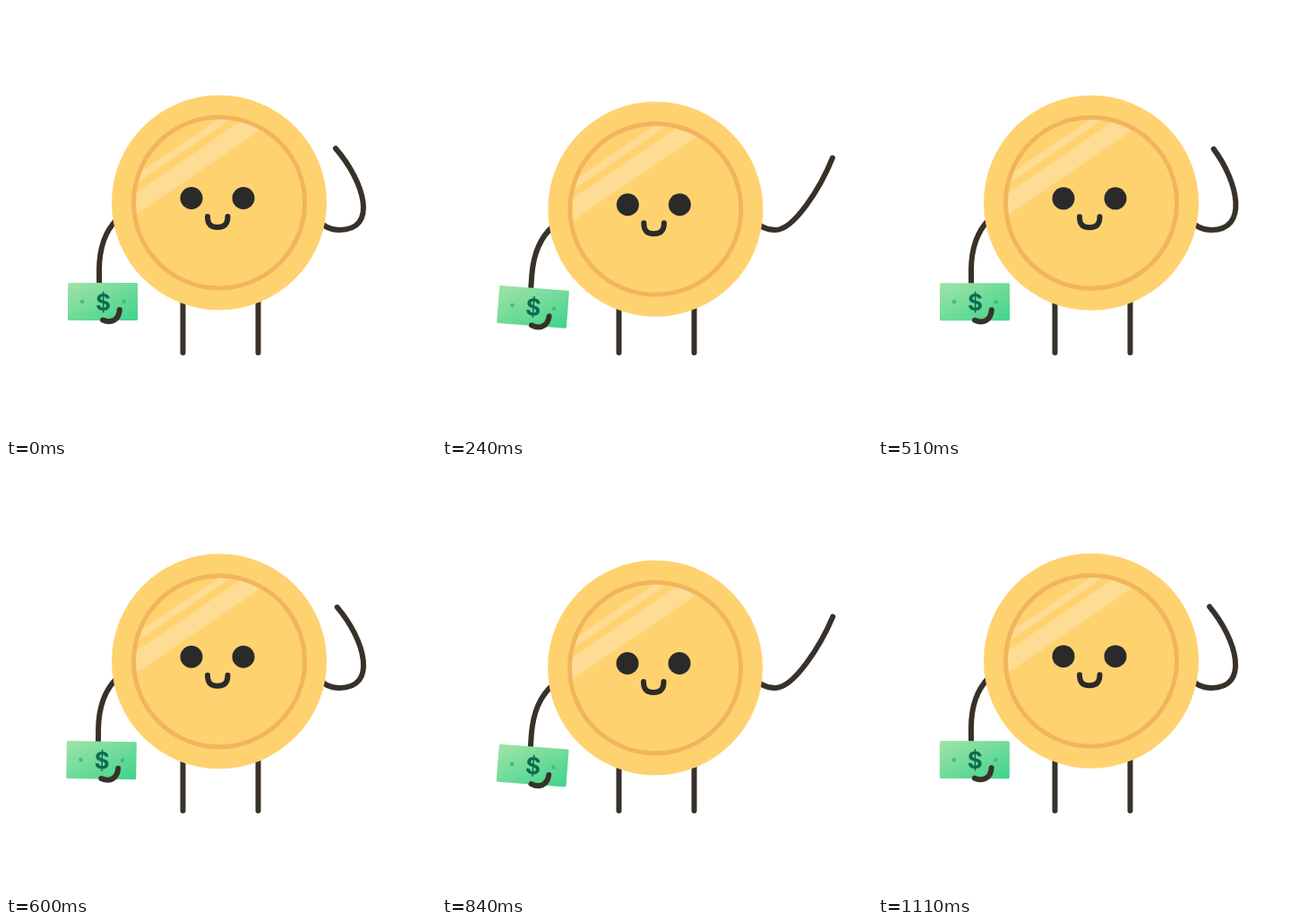
These frames come from a looping animation (480 by 480 pixels, 1.14 s). An HTML page:

```html
<!DOCTYPE html>
<html lang="en">
<head>
<meta charset="utf-8">
<title>Waving coin</title>
<style>
  html, body { margin: 0; width: 100%; height: 100%; overflow: hidden; background: #fff; }
  svg { display: block; width: 100vw; height: 100vh; }
  .limb { fill: none; stroke: #383129; stroke-width: 6; stroke-linecap: round; }
  .face { fill: #2a2a2a; }
  .smile { fill: none; stroke: #2a2a2a; stroke-width: 6; stroke-linecap: round; }
  .sign { font: 700 26px Inter, Roboto, sans-serif; fill: #0c6b50; text-anchor: middle; }
</style>
</head>
<body>
<svg viewBox="0 0 480 480">
  <defs>
    <linearGradient id="paper" x1="0" y1="0" x2="1" y2="1">
      <stop offset="0" stop-color="#a2e3a8"/>
      <stop offset="1" stop-color="#3fd38b"/>
    </linearGradient>
    <clipPath id="inner"><circle cx="238" cy="219.5" r="93"/></clipPath>
  </defs>

  <path class="limb" d="M197.500 322V387M281.500 322V387"/>
  <path class="limb" id="wave"/>

  <g id="holder">
    <path class="limb" d="M124 238C108 254 104 274 104 295Q104 325 106 345"/>
    <rect x="69" y="309" width="78" height="42" rx="1.500" fill="url(#paper)"/>
    <g fill="#45bb80">
      <circle cx="85" cy="330" r="2.300"/>
      <circle cx="131.500" cy="330" r="2.300"/>
    </g>
    <text class="sign" x="108.500" y="339.500">$</text>
    <path class="limb" d="M108 350.500C117 354.500 126 351 126.800 339"/>
  </g>

  <g id="coin">
    <circle cx="238" cy="219.500" r="120" fill="#ffd270"/>
    <g clip-path="url(#inner)" fill="#ffdc93">
      <path d="M130 199L270 103.800V113.400L130 208.600Z"/>
      <path d="M130 218.500L310 96.100V120.600L130 243Z"/>
    </g>
    <circle cx="238" cy="219.500" r="95.500" fill="none" stroke="#f2b45c" stroke-width="5"/>
    <g class="face">
      <circle cx="207" cy="214.500" r="12.500"/>
      <circle cx="265" cy="214.500" r="12.500"/>
    </g>
    <path class="smile" d="M225 235C225 243 228 247 236 247S247.500 243 247.500 235"/>
  </g>
</svg>
<script>
  const STEP = 30, COUNT = 38;
  // Steps at which each part is at rest, at its extreme, at rest, and so on
  const KEYS = {
    wave: [0, 9, 19, 29, 38],
    bob: [0, 10, 18, 28, 38],
    swing: [0, 9, 17, 27, 38]
  };
  const el = id => document.getElementById(id);
  const wave = el("wave"), holder = el("holder"), coin = el("coin");

  function swing(keys, n) {
    let i = 0;
    while (i < keys.length - 2 && n >= keys[i + 1]) i++;
    const u = (n - keys[i]) / (keys[i + 1] - keys[i]);
    const e = (1 - Math.cos(Math.PI * u)) / 2;
    return i % 2 ? 1 - e : e;
  }

  function draw(n) {
    const p = swing(KEYS.wave, n);
    const y = 8 * swing(KEYS.bob, n);
    const angle = 4.5 * swing(KEYS.swing, n);
    const x = n < 9 ? Math.sin(Math.PI * n / 9) : 0;

    coin.setAttribute("transform", `translate(${x} ${y})`);
    holder.setAttribute("transform", `translate(${x} ${y}) rotate(${angle} 122 240)`);
    wave.setAttribute("d",
      `M348 238C354 246 362 250 372 250` +
      `C${416 - 24 * p} 250 ${400 + 23 * p} ${196 + 7.5 * p} ${368 + 70 * p} ${159 + 3.5 * p + y}`);
  }

  const start = performance.now();
  function tick() {
    const t = performance.now() - start;
    draw(Math.floor(t / STEP) % COUNT);
    requestAnimationFrame(tick);
  }
  draw(0);
  requestAnimationFrame(tick);
</script>
</body>
</html>
```
